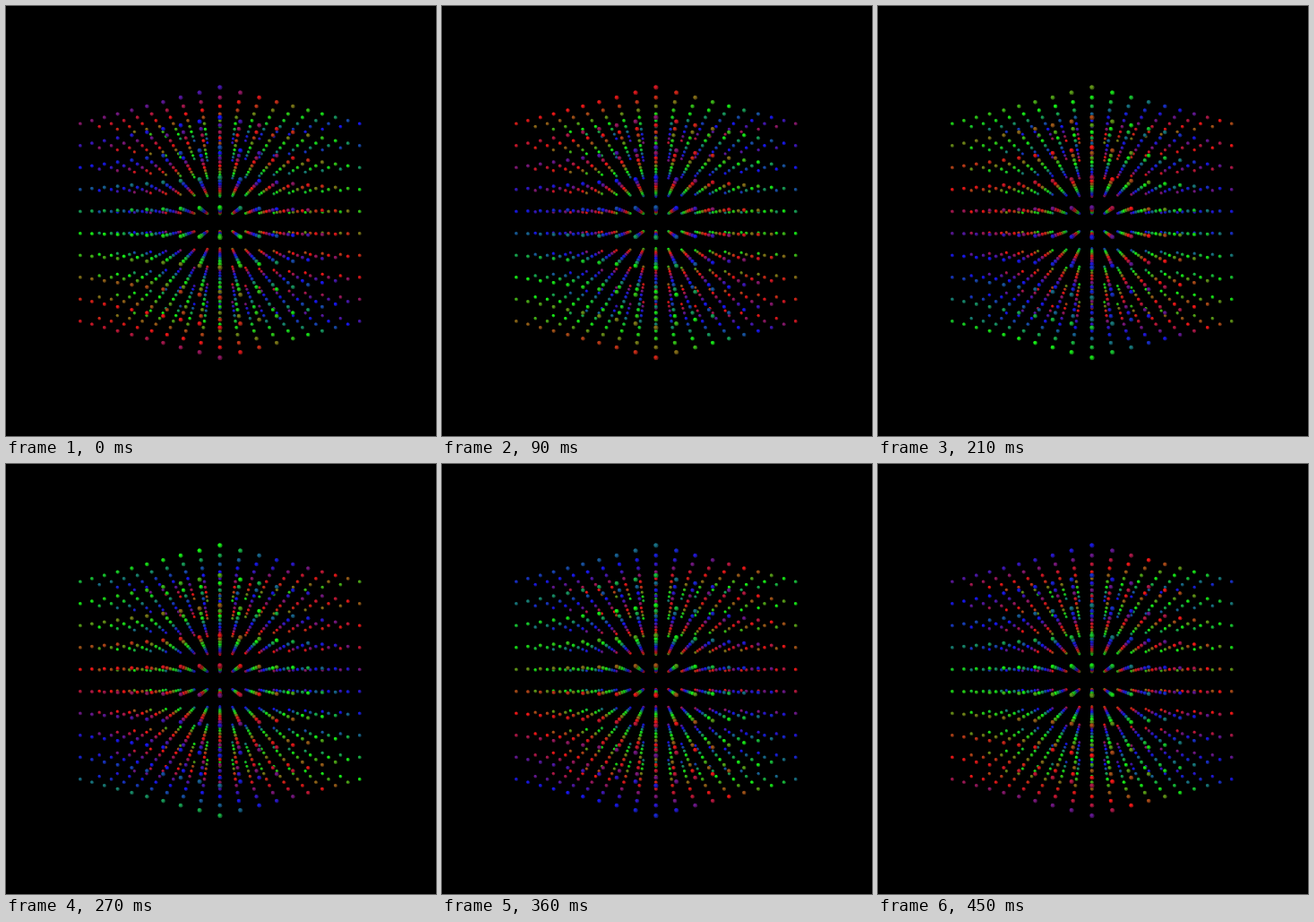
Write an HTML page with a canvas that moves like this. It is 480 by 480 pixels and loops after 0.48 s.

```html
<!DOCTYPE html>
<html>
<head>
<meta charset="utf-8">
<style>
  html, body { margin: 0; height: 100%; background: #000; overflow: hidden; }
  canvas { display: block; }
</style>
</head>
<body>
<canvas id="stage" width="480" height="480"></canvas>
<script>
const ctx = document.getElementById('stage').getContext('2d');
const SIZE = 10, MID = (SIZE - 1) / 2;
const FOCAL = 240 / Math.tan(Math.PI / 8), DISTANCE = 23.65;
const CENTER_X = 238.9, CENTER_Y = 241.7, RADIUS = 0.078;
const LOOP = 480, STEP = 30;

// A cube lattice seen edge-on, sorted from far to near.
const balls = [];
for (let right = 0; right < SIZE; right++)
  for (let left = 0; left < SIZE; left++)
    for (let row = 0; row < SIZE; row++) {
      const depth = DISTANCE + (right + left - 2 * MID) / Math.SQRT2;
      const scale = FOCAL / depth;
      balls.push({
        depth,
        x: CENTER_X + (right - left) / Math.SQRT2 * scale,
        y: CENTER_Y + (row - MID) * scale,
        r: RADIUS * scale,
        hue: 275 + 36 * right + 3.6 * left - 36 * row
      });
    }
balls.sort((a, b) => b.depth - a.depth);

// Linear blend between red, green and blue around the wheel.
function color(hue, light) {
  const channel = peak => {
    const gap = Math.abs(((hue - peak) % 360 + 540) % 360 - 180);
    return Math.round(255 * light * Math.max(0.1, 1 - gap / 120));
  };
  return `rgb(${channel(0)},${channel(120)},${channel(240)})`;
}

function disc(x, y, r, fill) {
  ctx.fillStyle = fill;
  ctx.beginPath();
  ctx.arc(x, y, r, 0, 2 * Math.PI);
  ctx.fill();
}

function draw(now) {
  const time = Math.floor(now % LOOP / STEP) * STEP;
  ctx.clearRect(0, 0, 480, 480);
  for (const { x, y, r, hue } of balls) {
    const h = hue + 360 * time / LOOP;
    disc(x, y, r, color(h, 0.6));
    disc(x - r * 0.2, y - r * 0.2, r * 0.7, color(h, 0.95));
  }
}

function tick() {
  draw(performance.now());
  requestAnimationFrame(tick);
}
tick();
</script>
</body>
</html>
```
